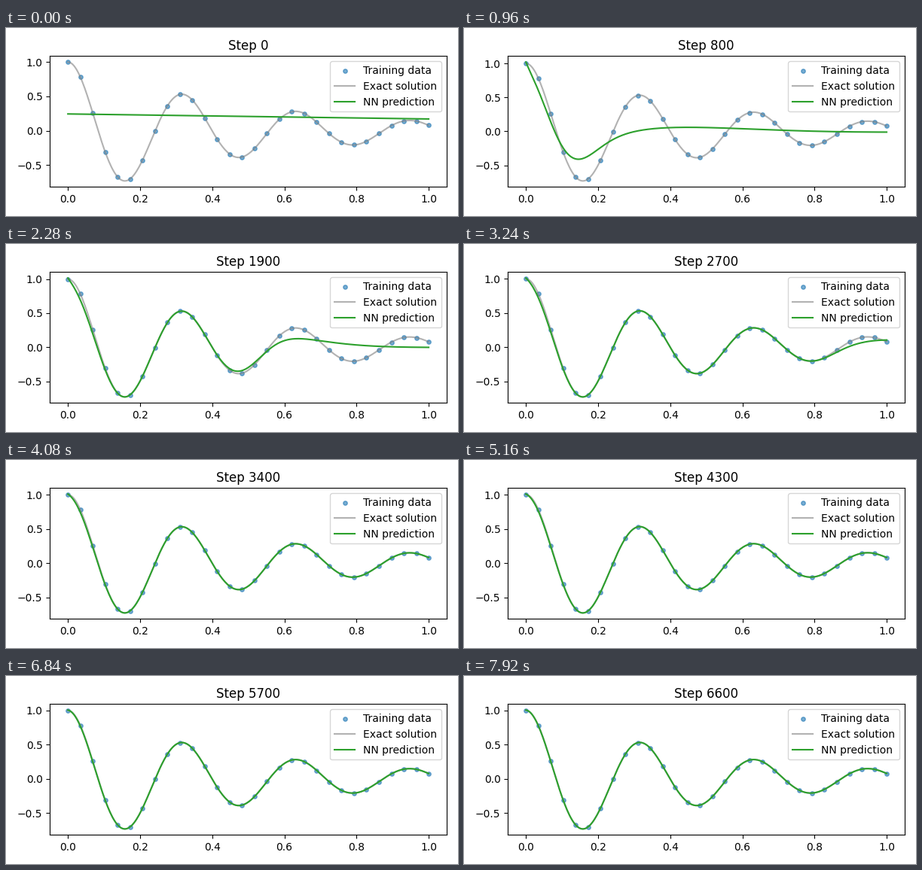
Animation, 600 px wide and 250 px high, one loop 8000 ms. Source, as a matplotlib script:

```python
import numpy as np
import matplotlib.pyplot as plt
from matplotlib.animation import FuncAnimation

STEP_FRAMES = 3      # each training snapshot is held for 3 x 40 ms
FRAMES, INTERVAL = 200, 40
WARMUP = 800         # steps until the first trough is learned


def exact(t, d=2.0, w0=20.0):
    """Damped oscillator released from rest at 1."""
    w = np.sqrt(w0 ** 2 - d ** 2)
    return np.exp(-d * t) * (np.cos(w * t) + d / w * np.sin(w * t))


def learned(t, step):
    """Exact up to a moving front; slower and weaker beyond it."""
    front = 0.22 + 0.000355 * (step - WARMUP)
    width = 0.04
    s = t - 0.7 * width * np.logaddexp(0, (t - front) / width)

    # The slope at t = 0 is learned last
    bias = 0.0935 * np.exp(-step / 1900)
    s = np.sqrt(s ** 2 + bias * t * np.exp(-t / 0.045))
    lift = 0.025 * np.exp(-step / 4000 - t / 0.02)

    reach = front * (0.65 + 0.65 * front)
    gain = 1 / (1 + (t / reach) ** (12 * reach - 0.1))
    return gain * exact(s) + lift


def predict(t, step):
    if step >= WARMUP:
        return learned(t, step)
    k = (step / WARMUP) ** 5
    flat = 0.05 * (1 - t) + (0.195 - 0.023 * t) * np.exp(-step / 100)
    return (1 - k) * flat + k * learned(t, WARMUP)


t = np.linspace(0, 1, 300)
u = exact(t)
t_obs = np.linspace(0, 1, 30)

fig, ax = plt.subplots(figsize=(6, 2.5), dpi=100)
ax.scatter(t_obs, exact(t_obs), s=15, color="tab:blue", alpha=0.6,
           label="Training data")
ax.plot(t, u, color="tab:gray", alpha=0.6, label="Exact solution")
line, = ax.plot(t, predict(t, 0), color="tab:green", label="NN prediction")
title = ax.set_title("Step 0")
ax.legend(loc="upper right")
fig.tight_layout()


def draw(frame):
    step = frame // STEP_FRAMES * 100
    y = predict(t, step)
    line.set_ydata(y)
    lo, hi = min(u.min(), y.min()), max(u.max(), y.max())
    pad = 0.05 * (hi - lo)
    ax.set_ylim(lo - pad, hi + pad)
    title.set_text(f"Step {step}")
    return line, title


anim = FuncAnimation(fig, draw, frames=FRAMES, interval=INTERVAL,
                     repeat=True, repeat_delay=0)
plt.show()
```
